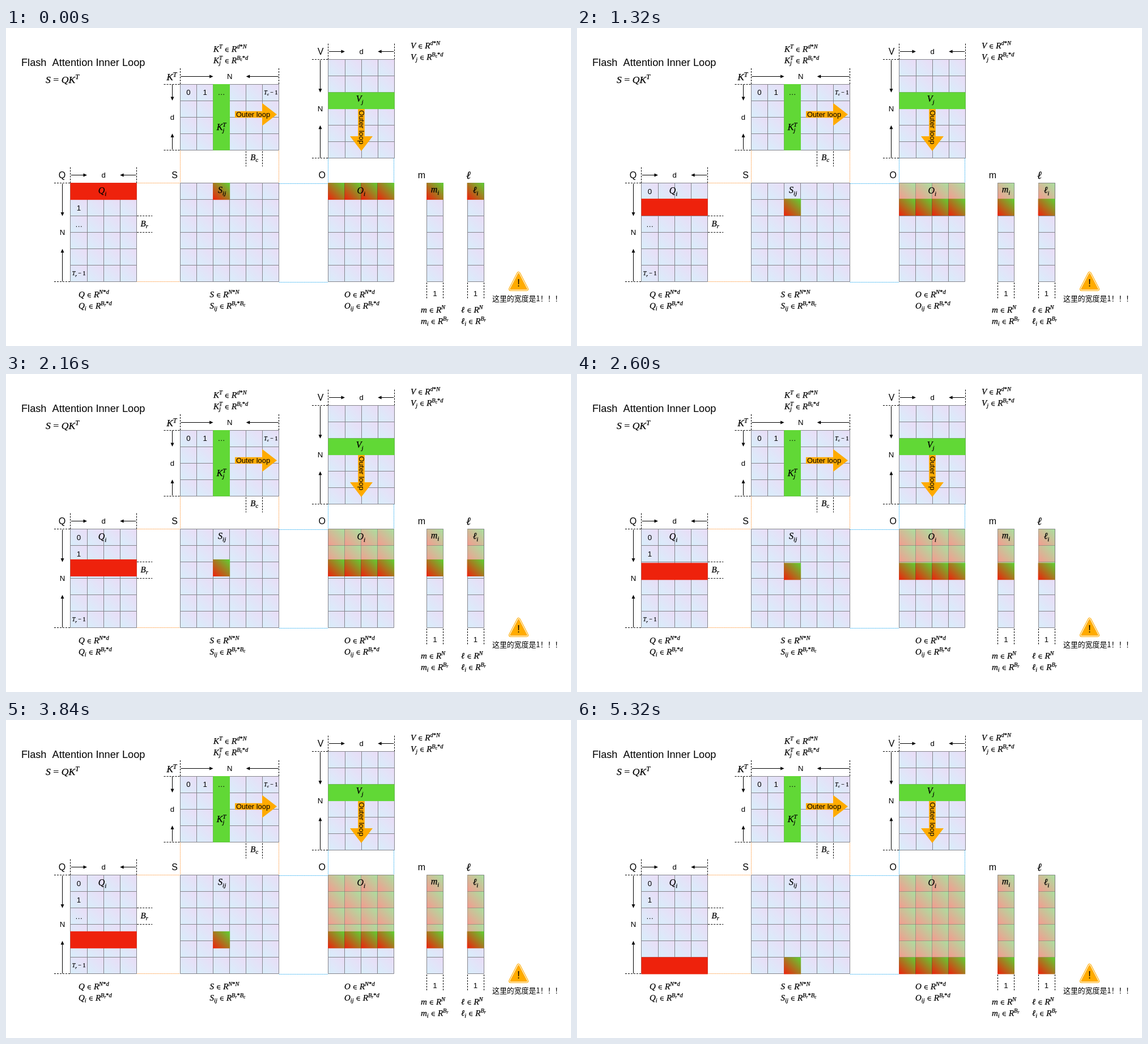
These frames come from a looping animation (997x561 px, 5.36 s). An HTML page with a canvas:

```html
<!DOCTYPE html>
<html>
<head>
<meta charset="utf-8">
<style>
html, body { margin: 0; width: 997px; height: 561px; overflow: hidden; background: #fff; }
canvas { display: block; }
</style>
</head>
<body>
<canvas id="stage" width="997" height="561"></canvas>
<script>
const ctx = document.getElementById('stage').getContext('2d');
const SANS = '"Liberation Sans", Arial, sans-serif';
const SERIF = '"Liberation Serif", "DejaVu Serif", serif';
const CJK = '"Noto Sans CJK SC", "Noto Sans CJK", sans-serif';
const CELL = 29.06, TOP = 273.6, ROWS = 6;
const LOOP = 5360, STEP = 40, START = 480, MOVE = 970;
const AMBER = '#ffab00', GREEN = '#61d836', RED = '#ee220c', BLUE = '#1fa9f0', PEACH = '#ff9330';
const PASTEL = ['#d8eefb', '#eadcf6'], MIX = [RED, '#5fcf33'], FADED = ['#f59a8f', '#a9e09f'];

const panel = (x, y, cols, rows) => ({
  x, y, cols, rows,
  right: x + cols * CELL, bottom: y + rows * CELL,
  midX: x + cols * CELL / 2, midY: y + rows * CELL / 2
});
const K = panel(307.5, 99, 6, 4);
const V = panel(568.97, 55.6, 4, 6);
const Q = panel(113.97, TOP, 4, ROWS);
const S = panel(307.5, TOP, 6, ROWS);
const O = panel(568.6, TOP, 4, ROWS);
const M = panel(742.5, TOP, 1, ROWS);
const L = panel(814, TOP, 1, ROWS);

const snap = v => Math.round(v - 0.5) + 0.5;

function box(x, y, w, h, color) {
  ctx.fillStyle = color;
  ctx.fillRect(x, y, w, h);
}

// Diagonal gradient from the bottom left to the top right
function shade(x, y, [from, to], grow = 0) {
  const g = ctx.createLinearGradient(x, y + CELL, x + CELL, y);
  g.addColorStop(0, from);
  g.addColorStop(1, to);
  box(x - grow, y - grow, CELL + 2 * grow, CELL + 2 * grow, g);
}

function cells(p, rows, colors) {
  for (let r = 0; r < rows; r++)
    for (let c = 0; c < p.cols; c++) shade(p.x + c * CELL, p.y + r * CELL, colors);
}

function line(x1, y1, x2, y2, color = '#000', dash = []) {
  ctx.strokeStyle = color;
  ctx.lineWidth = 1;
  ctx.setLineDash(dash);
  ctx.beginPath();
  ctx.moveTo(x1, y1);
  ctx.lineTo(x2, y2);
  ctx.stroke();
  ctx.setLineDash([]);
}

const dashX = (x1, x2, y) => line(x1, snap(y), x2, snap(y), '#000', [3, 2]);
const dashY = (x, y1, y2) => line(snap(x), y1, snap(x), y2, '#000', [3, 2]);
const dotX = (x1, x2, y, color) => line(x1, snap(y), x2, snap(y), color, [1.3, 1.1]);
const dotY = (x, y1, y2, color) => line(snap(x), y1, snap(x), y2, color, [1.3, 1.1]);

function rules(p, rows, color) {
  for (let c = 0; c <= p.cols; c++) {
    const x = snap(p.x + c * CELL);
    line(x, snap(p.y), x, snap(p.y + rows * CELL), color);
  }
  for (let r = 0; r <= rows; r++) {
    const y = snap(p.y + r * CELL);
    line(snap(p.x), y, snap(p.right), y, color);
  }
}

function grid(p) {
  cells(p, p.rows, PASTEL);
  rules(p, p.rows, '#85858c');
}

function polygon(points, color) {
  ctx.fillStyle = color;
  ctx.beginPath();
  points.forEach(([x, y]) => ctx.lineTo(x, y));
  ctx.closePath();
  ctx.fill();
}

function rotated(x, y, angle, paint) {
  ctx.save();
  ctx.translate(x, y);
  ctx.rotate(angle);
  paint();
  ctx.restore();
}

function arrow(x, y, angle, length) {
  rotated(x, y, angle, () => {
    line(0, 0, length - 5, 0);
    polygon([[length, 0], [length - 6.5, -3], [length - 6.5, 3]], '#000');
  });
}

function label(s, x, y, size = 13.2, align = 'center', family = SANS) {
  ctx.font = size + 'px ' + family;
  ctx.textAlign = align;
  ctx.fillStyle = '#000';
  ctx.fillText(s, x, y);
}

// Small math setter: ^{..} raises, _{..} lowers; adjacent scripts stack
function math(s, x, y, size = 15, paint = true) {
  let scriptX = null, end = x;
  for (let i = 0; i < s.length; i++) {
    const ch = s[i];
    if (ch === '^' || ch === '_') {
      let depth = 0, j = i + 1;
      do {
        if (s[j] === '{') depth++;
        if (s[j] === '}') depth--;
        j++;
      } while (depth);
      if (scriptX === null) scriptX = end;
      const shift = ch === '^' ? -0.38 : 0.22;
      end = Math.max(end, math(s.slice(i + 2, j - 1), scriptX, y + shift * size, size * 0.7, paint));
      i = j - 1;
      continue;
    }
    scriptX = null;
    const pad = '∈=−'.includes(ch) ? size * 0.26 : 0;
    const style = /[A-Za-zℓ]/.test(ch) ? 'italic ' : '';
    ctx.font = style + size * (ch === '∈' ? 0.75 : 1) + 'px ' + SERIF;
    ctx.textAlign = 'left';
    ctx.fillStyle = ctx.strokeStyle = '#000';
    ctx.lineWidth = 0.25;
    end += pad;
    if (paint) {
      ctx.fillText(ch, end, y);
      ctx.strokeText(ch, end, y);
    }
    end += ctx.measureText(ch).width + pad;
  }
  return end;
}

const mathMid = (s, x, y, size = 15) => math(s, x - math(s, 0, 0, size, false) / 2, y, size);

function formulas(x, y, whole, block) {
  math(whole, x, y);
  math(block, x, y + 19.5);
}

// Extent marks above and to the left of a panel, with inward arrows
function extents(p, across, down) {
  const spanX = (p.cols / 2 - 1) * CELL - 1, spanY = (p.rows / 2 - 1) * CELL - 1;
  const ax = snap(p.x - 14.5), ay = snap(p.y - 14);
  [p.x, p.right].forEach(x => dashY(x, p.y - 28, p.y));
  [p.y, p.bottom].forEach(y => dashX(p.x - 29, p.x, y));
  arrow(p.x + 1, ay, 0, spanX);
  arrow(p.right - 1, ay, Math.PI, spanX);
  arrow(ax, p.y + 1, Math.PI / 2, spanY);
  arrow(ax, p.bottom - 1, -Math.PI / 2, spanY);
  label(across, p.midX, ay + 4.5);
  label(down, ax, p.midY + 4.5);
}

function guides() {
  extents(K, 'N', 'd');
  extents(V, 'd', 'N');
  extents(Q, 'd', 'N');
  [4, 5].forEach(c => dashY(K.x + c * CELL, K.bottom + 2, K.bottom + 29));
  [2, 3].forEach(r => dashX(Q.right + 1, Q.right + 28, Q.y + r * CELL));
  [M, L].forEach(p => {
    [p.x, p.right].forEach(x => dashY(x, p.bottom + 1, p.bottom + 30));
    label('1', p.midX, p.bottom + 25);
  });
  [S.x, S.right].forEach(x => dotY(x, K.bottom, S.y, PEACH));
  [O.x, O.right].forEach(x => dotY(x, V.bottom, O.y, BLUE));
  [S.y, S.bottom].forEach(y => {
    dotX(Q.right, S.x, y, PEACH);
    dotX(S.right, O.x, y + 0.6, BLUE);
  });
}

function outerLoop(x, y, angle) {
  rotated(x, y, angle, () => {
    polygon([[0, -5.8], [48, -5.8], [48, -20], [74, 0], [48, 20], [48, 5.8], [0, 5.8]], AMBER);
    label('Outer loop', 32, 4.5, 12.9);
  });
}

function warning() {
  ctx.lineJoin = 'round';
  ctx.beginPath();
  ctx.moveTo(904.5, 433.5);
  ctx.lineTo(918.5, 460.5);
  ctx.lineTo(890.5, 460.5);
  ctx.closePath();
  [[7, AMBER], [4.8, '#fff'], [2.6, AMBER]].forEach(([width, color]) => {
    ctx.lineWidth = width;
    ctx.strokeStyle = color;
    ctx.stroke();
  });
  ctx.fillStyle = AMBER;
  ctx.fill();
  label('!', 904.5, 456, 18);
  label('这里的宽度是1！！！', 858, 482, 12.9, 'left', CJK);
}

function captions() {
  label('Flash  Attention Inner Loop', 27, 67, 18.2, 'left');
  math('S=QK^{T}', 70, 97, 17.6);
  mathMid('K^{T}', K.x - 15, K.y - 7, 17);
  label('Q', Q.x - 15, Q.y - 9, 16);
  label('V', V.x - 14, V.y - 9, 16);
  label('S', S.x - 10, S.y - 9, 16);
  label('O', O.x - 11, O.y - 9, 16);
  label('m', M.x - 9, M.y - 9, 16);
  mathMid('ℓ', L.x + 2, L.y - 8, 19);
  mathMid('B_{c}', K.x + 4.5 * CELL, 233);
  mathMid('B_{r}', Q.right + 14, 350);
  formulas(366, 42, 'K^{T}∈R^{d*N}', 'K^{T}_{j}∈R^{B_{c}*d}');
  formulas(714, 36, 'V∈R^{d*N}', 'V_{j}∈R^{B_{c}*d}');
  formulas(128, 475, 'Q∈R^{N*d}', 'Q_{i}∈R^{B_{r}*d}');
  formulas(359.5, 475, 'S∈R^{N*N}', 'S_{ij}∈R^{B_{r}*B_{c}}');
  formulas(597, 475, 'O∈R^{N*d}', 'O_{ij}∈R^{B_{r}*d}');
  formulas(732, 502, 'm∈R^{N}', 'm_{i}∈R^{B_{r}}');
  formulas(803, 502, 'ℓ∈R^{N}', 'ℓ_{i}∈R^{B_{r}}');
}

function inCell(p, c, r, s) {
  const x = p.x + (c + 0.5) * CELL, y = p.y + (r + 0.5) * CELL;
  if (s.length > 1) mathMid(s, x, y + 3, 9.8);
  else label(s, x, y + 4.8);
}

function blockNames() {
  mathMid('K^{T}_{j}', K.x + 2.5 * CELL, 180, 16);
  mathMid('V_{j}', V.midX - 3, 130, 16);
  const y = TOP + 18.5;
  mathMid('Q_{i}', Q.midX - 2, y, 16);
  mathMid('S_{ij}', S.x + 2.5 * CELL + 1, y - 1, 16);
  mathMid('O_{i}', O.midX, y, 16);
  mathMid('m_{i}', M.midX, y - 2, 16);
  mathMid('ℓ_{i}', L.midX, y - 1, 16);
}

function offset(t) {
  const n = Math.max(0, (t - START) / MOVE);
  const k = Math.min(Math.floor(n), ROWS - 2);
  const p = Math.min(n - k, 1);
  const eased = p < 0.5 ? 2 * p * p : 1 - 2 * (1 - p) * (1 - p);
  return (k + eased) * CELL;
}

function draw(t) {
  box(0, 0, 997, 561, '#fff');
  guides();
  [K, V, Q, S, O, M, L].forEach(grid);

  ['0', '1'].forEach((s, i) => {
    inCell(K, i, 0, s);
    inCell(Q, 0, i, s);
  });
  inCell(K, K.cols - 1, 0, 'T_{c}−1');
  inCell(Q, 0, ROWS - 1, 'T_{r}−1');
  inCell(Q, 0, 2, '…');
  box(K.x + 2 * CELL - 0.3, K.y, CELL + 0.6, 4 * CELL + 0.5, GREEN);
  box(V.x - 0.4, V.y + 2 * CELL - 0.3, 4 * CELL + 0.8, CELL + 0.6, GREEN);
  inCell(K, 2, 0, '…');
  outerLoop(404, 152.5, 0);
  outerLoop(627, 143, Math.PI / 2);

  const dy = offset(t), y = TOP + dy;
  const visited = Math.floor(dy / CELL + 1e-6) + 1;
  [O, M, L].forEach(p => {
    cells(p, visited, FADED);
    rules(p, visited, 'rgba(110,110,110,0.4)');
    for (let c = 0; c < p.cols; c++) shade(p.x + c * CELL, y, MIX, 0.4);
    for (let c = 1; c < p.cols; c++) {
      const x = snap(p.x + c * CELL);
      line(x, y, x, y + CELL, 'rgba(70,60,40,0.4)');
    }
  });
  box(Q.x - 0.5, y - 0.5, 4 * CELL + 1, CELL + 1, RED);
  shade(S.x + 2 * CELL, y, MIX, 0.5);

  captions();
  blockNames();
  warning();
}

function tick() {
  const t = performance.now() % LOOP;
  draw(Math.floor(t / STEP) * STEP);
  requestAnimationFrame(tick);
}
tick();
</script>
</body>
</html>
```
